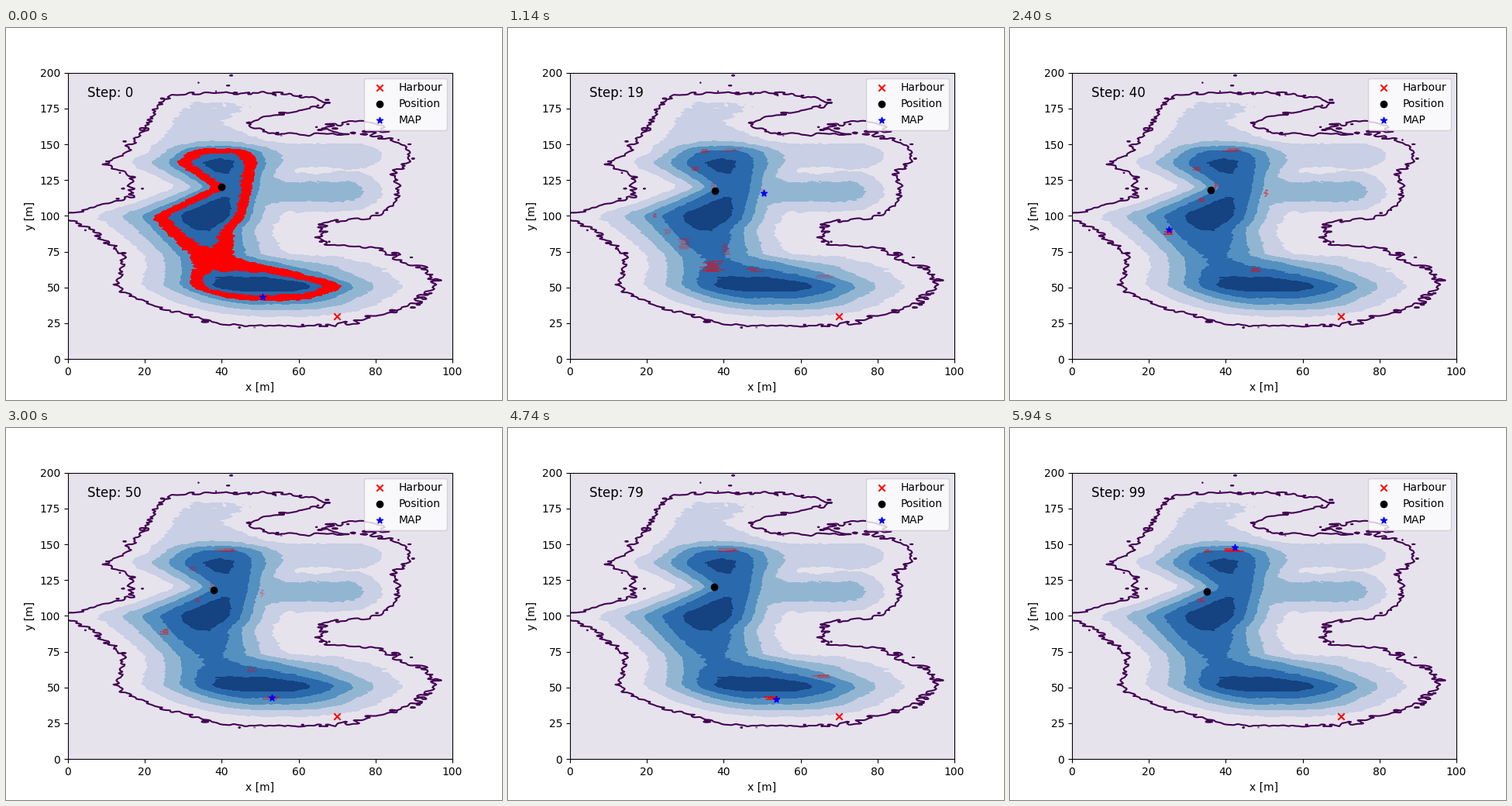
A matplotlib script that plays this animation: 640 by 480 pixels, repeating every 6000 ms.

```python
import numpy as np
import matplotlib.pyplot as plt
from matplotlib.animation import FuncAnimation
from matplotlib.collections import LineCollection

STEPS, INTERVAL = 100, 60
COLORS = ["#e6e3ed", "#c9cfe4", "#92b6d2", "#5491c1", "#2a69ac", "#154281"]
COAST = .33
rng = np.random.default_rng(7)

# Cross-sections of the basin: y, depth, then where the flat middle
# starts, its left falloff, where it ends, its right falloff.
SECTIONS = np.array([
    (20, .1, 52, 13, 60, 14),
    (30, .9, 52, 13, 60, 14),
    (43, 4.1, 48, 13.5, 56, 16),
    (51, 5.7, 44.5, 13.5, 56, 16.7),
    (65, 4.1, 38, 10.4, 38, 24),
    (72, 4.1, 37, 9.9, 37, 11),
    (90, 5, 35, 12.4, 35, 9.8),
    (100, 5.7, 37, 16, 37, 9.5),
    (120, 4.6, 43.4, 8.1, 43.4, 6.5),
    (137, 5.3, 39.5, 13, 39.5, 11),
    (145, 4.3, 37, 9, 42, 9),
    (151, 2, 37, 11, 41, 9),
    (165, 1.25, 32, 6.5, 35, 6),
    (178, 1.05, 34, 7, 40, 18),
    (187, .2, 34, 8, 46, 18)])

# Shallow side banks: depth, the same four edges, middle y, spread in y.
BANKS = [
    (2.5, 55, 5, 72, 7, 117, 10),
    (1.6, 50, 6, 73, 9, 142, 8.5),
    (1.4, 45, 6, 66, 13, 64, 9.5),
    (.7, 58, 7, 58, 7, 92, 14),
    (.6, 26, 9, 26, 9, 121, 12),
    (.5, 75, 8, 75, 8, 162, 4)]

# Places the belief returns to: x, y, width, height.
PLACES = [
    (35, 145.5, 2.5, 2), (41.5, 146, 5, 2), (32.5, 133, 2, 3), (37.3, 121, 1.3, 4),
    (33.5, 111, 2, 2.5), (22, 100.5, 1.2, 3), (25.3, 89.5, 2.4, 4),
    (37, 65, 6, 8), (48, 62.3, 4, 2.5), (66, 58, 5, 2), (53, 43, 4, 2),
    (50.5, 116, 1, 5), (29.5, 81, 3, 8), (40.5, 77, 2, 8)]

# Step: boat, best guess, places still believed in.
KEYS = {
    0: ((40, 120), (50.6, 43.3), ()),
    12: ((37.1, 117), (37.3, 64.5), (0, 2, 5, 7, 11, 12, 13)),
    28: ((38.4, 118), (48.4, 62.4), (0, 1, 2, 3, 5, 6, 8, 9)),
    40: ((36.1, 118), (25.2, 90.4), (1, 2, 3, 4, 6, 8, 11)),
    60: ((40.2, 118), (54.6, 44.4), (1, 10)),
    79: ((37.5, 120), (53.6, 42), (1, 9, 10)),
    99: ((35, 117), (42.4, 148), (0, 1, 4)),
}
MARKS = sorted(KEYS)


def plateau(x, lo, left, hi, right):
    """Flat from lo to hi, Gaussian flanks on both sides."""
    d = np.maximum(lo - x, 0) / left + np.maximum(x - hi, 0) / right
    return np.exp(-d ** 2 / 2)


def bump(x, mid, spread):
    return plateau(x, mid, spread, mid, spread)


def grain(shape, size):
    """Noise drawn out sideways, with unit spread."""
    n = rng.normal(size=shape)
    n = np.array([np.convolve(row, np.hanning(7), "same") for row in n])
    return size * n / n.std()


def basin(x, y):
    """Depth in contour steps, the banks blended into the basin."""
    soft = y + np.linspace(-2, 2, 5)[:, None, None]
    depth, *edges = [np.interp(soft, SECTIONS[:, 0], col).mean(0)
                     for col in SECTIONS.T[1:]]
    cubes = (depth * plateau(x, *edges)) ** 3
    for top, *sides, mid, spread in BANKS:
        cubes = cubes + (top * plateau(x, *sides) * bump(y, mid, spread)) ** 3
    return np.cbrt(cubes) - .25 * bump(x, 62, 5) * bump(y, 131, 3.5)


xs, ys = np.linspace(0, 100, 201), np.linspace(0, 200, 201)
depth = basin(xs[None, :], ys[:, None])
depth += grain(depth.shape, .05)

fig = plt.figure(figsize=(6.4, 4.8), dpi=100)
ax = fig.add_subplot()
ax.set(xlim=(0, 100), ylim=(0, 200), xlabel="x [m]", ylabel="y [m]")
ax.contourf(xs, ys, depth, levels=[-1, 1, 2, 3, 4, 5, 9], colors=COLORS)
ax.contour(xs, ys, depth, levels=[COAST], colors="#440154", zorder=2.5)

# The first belief is a whole depth band, thinner after each reading.
rough = depth + grain(depth.shape, .06)
bands = []
for step in range(12):
    half = .4 * .72 ** step
    bands.append(ax.contourf(xs, ys, rough, levels=[4.03 - half, 4.03 + half],
                             colors="red", alpha=1 - .05 * step, zorder=2))

belief = LineCollection([], linewidths=1.1, capstyle="butt", zorder=2.2)
ax.add_collection(belief)
ax.scatter([70], [30], c="red", marker="x", label="Harbour", zorder=3)
boat = ax.scatter([40], [120], c="black", label="Position", zorder=3.1)
guess = ax.scatter([50], [43], c="blue", marker="*", label="MAP", zorder=3.2)
ax.legend(loc="upper right")
label = ax.text(5, 183, "", fontsize=12)


def slivers(place, seed):
    """Thin rows that make up one patch of belief."""
    x, y, w, h = place
    r = np.random.default_rng(seed)
    rows = np.arange(-h / 2, h / 2, .8)
    mid = x + r.uniform(-.2, .2, len(rows)) * w
    half = w / 2 * r.uniform(.4, 1, len(rows))
    return [[(m - d, y + k), (m + d, y + k)] for m, d, k in zip(mid, half, rows)]


def strength(place, star):
    """Belief is strongest around the best guess."""
    gap = np.hypot(place[0] - star[0], (place[1] - star[1]) / 2)
    return .45 + .5 * np.exp(-(gap / 4) ** 2)


def state(step):
    """Boat, best guess and weighted patches at a step."""
    i = min(np.searchsorted(MARKS, step, "right") - 1, len(MARKS) - 2)
    k0, k1 = MARKS[i], MARKS[i + 1]
    u = (step - k0) / (k1 - k0)
    wobble = np.random.default_rng(500 + step).normal(0, .45, 2) * np.sin(np.pi * u)
    pos = np.multiply(KEYS[k0][0], 1 - u) + np.multiply(KEYS[k1][0], u) + wobble

    near = k0 if u < .5 else k1
    _, star, spots = KEYS[near]
    if abs(step - near) > 2 and spots:
        hop = np.random.default_rng(900 + step // 3)
        star = PLACES[hop.choice(spots)][:2]

    patches = [(PLACES[n], weight * strength(PLACES[n], KEYS[key][1]), 40 * key + n)
               for key, weight in ((k0, 1 - u), (k1, u)) for n in KEYS[key][2]]
    return pos, star, patches


def update(step):
    pos, star, patches = state(step)
    boat.set_offsets([pos])
    guess.set_offsets([star])
    label.set_text(f"Step: {step}")
    for n, band in enumerate(bands):
        band.set_visible(n == step)

    bars, colors = [], []
    for place, alpha, seed in patches:
        if alpha > .12:
            rows = slivers(place, seed)
            bars += rows
            colors += [(1, 0, 0, alpha)] * len(rows)
    belief.set_segments(bars)
    belief.set_color(colors or "none")
    return boat, guess, label, belief, *bands


anim = FuncAnimation(fig, update, frames=STEPS, interval=INTERVAL, repeat=True)
plt.show()
```
